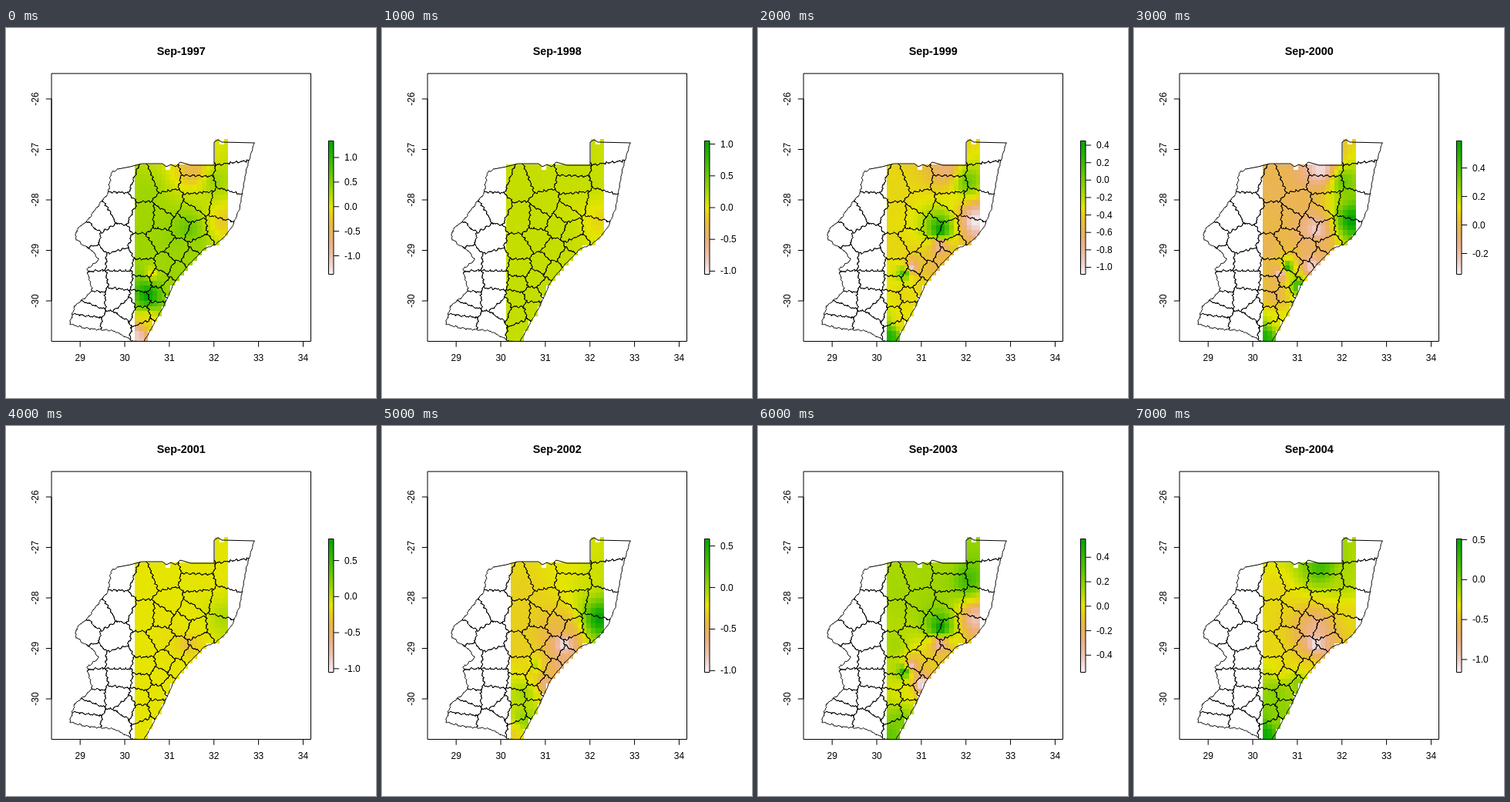
Animation, 480 px wide and 480 px high, one loop 8 s. Source, as an HTML page with a canvas:

```html
<!DOCTYPE html>
<html>
<head>
<meta charset="utf-8">
<style>
html, body { margin: 0; width: 100%; height: 100%; overflow: hidden; background: #fff; }
canvas { display: block; width: 480px; height: 480px; }
</style>
</head>
<body>
<canvas id="stage" width="480" height="480"></canvas>
<script>
const ctx = document.getElementById('stage').getContext('2d');
const FONT = '"Liberation Sans", Arial, sans-serif';
const LINE = 14.4;
const PLOT = { left: 59.04, top: 59.04, right: 395.5, bottom: 406.5 };
const GRID = { x: 167, y: 144.4, w: 5.785, h: 6.55, cols: 21, rows: 40 };
const BAR = { x: 418, y: 146, w: 7, h: 173 };

// Gauge sites: x, y and weight. The surface is an inverse-distance blend of them.
const gauges = {
  west: [185, 215, 1], inner: [178, 285, .8], north: [242, 183, 1], lake: [272, 200, 1],
  east: [282, 250, 1], hill: [236, 262, .9], river: [236, 282, .6], bay: [230, 308, .5],
  ridge: [199, 310, .25], dam: [190, 318, .25], port: [213, 334, .4],
  valley: [184, 346, .9], south: [185, 380, .7], cape: [170, 400, .7]
};

// Levels run from 0 (bottom of the colour bar) to 100 (top); unlisted gauges sit at base.
const years = [
  { lo: -1.376, hi: 1.337, step: .5, base: 63, at: { north: 34, east: 42, hill: 75, dam: 45, valley: 100, south: 46, cape: 8 } },
  { lo: -1.05, hi: 1.05, step: .5, base: 56, extra: 1, at: { east: 46 } },
  { lo: -1.08, hi: .449, step: .2, base: 46, at: { north: 25, lake: 73, east: 1, hill: 100, river: 15, bay: 33, ridge: 5, dam: 88, cape: 92 } },
  { lo: -.346, hi: .59, step: .2, base: 32, at: { north: 4, lake: 73, east: 100, hill: 8, bay: 5, ridge: 92, dam: 4, port: 86, south: 50, cape: 92 } },
  { lo: -1.05, hi: .8, step: .5, base: 50, at: { east: 60, river: 38 } },
  { lo: -1.02, hi: .585, step: .5, base: 44, at: { north: 50, lake: 54, east: 100, hill: 36, river: 0, bay: 25, ridge: 60, port: 22, valley: 62, south: 66 } },
  { lo: -.54, hi: .55, step: .2, base: 62, at: { lake: 83, east: 12, hill: 100, river: 12, bay: 42, ridge: 8, dam: 95, port: 0, valley: 52, south: 70, cape: 75 } },
  { lo: -1.16, hi: .51, step: .5, base: 46, at: { north: 83, lake: 60, hill: 20, river: 0, port: 68, valley: 68, south: 66, cape: 97 } }
];

const parse = s => s.split(' ').map(p => p.split(',').map(Number));

const north = parse('145,183 161,180 176,176 203,176 208,180 214,177 220,180 226,174 240,178 270,178 270,148 275,145 280,148 322,149');
const coast = parse('322,149 312,183 303,234 293,259 283,271 272,281 258,286 238,306 219,329 205,360 179,407');
const west = parse('145,183 136,188 133,213 121,229 105,251 92,261 90,274 113,290 120,302 105,313 112,341 89,361 83,384 106,390 140,393 166,407');

// District centres; borders lie midway between neighbours.
const centres = parse(
  '150,195 148,232 122,247 104,268 140,275 112,300 148,303 115,331 148,327 145,350 112,351 107,365 105,382 142,385 157,364 ' +
  '178,205 206,194 246,203 247,180 290,160 294,190 283,232 248,225 213,229 180,246 203,247 238,240 275,262 ' +
  '228,256 200,274 246,264 222,290 253,280 179,287 240,300 180,312 208,306 222,314 178,332 198,326 212,337 195,346 175,352 196,365 175,371 184,392'
);

// A smooth displacement that makes straight borders meander like surveyed ones.
function meander([x, y], size) {
  return [
    x + size * (Math.sin(.75 * y + .4 * x) + .8 * Math.sin(1.7 * y - .9 * x)),
    y + size * (Math.sin(.8 * x - .3 * y) + .8 * Math.sin(1.6 * x + 1.1 * y))
  ];
}

function roughen(points, size) {
  const out = [];
  for (let i = 1; i < points.length; i++) {
    const [ax, ay] = points[i - 1], [bx, by] = points[i];
    const n = Math.ceil(Math.hypot(bx - ax, by - ay) / 1.3);
    for (let k = 0; k <= n; k++) {
      out.push(meander([ax + (bx - ax) * k / n, ay + (by - ay) * k / n], size));
    }
  }
  return out;
}

// Keeps the part of a polygon that is nearer to a than to b.
function nearer(polygon, a, b) {
  const side = ([x, y]) =>
    (x - (a[0] + b[0]) / 2) * (b[0] - a[0]) + (y - (a[1] + b[1]) / 2) * (b[1] - a[1]);
  const out = [];
  polygon.forEach((p, i) => {
    const q = polygon[(i + 1) % polygon.length];
    const sp = side(p), sq = side(q);
    if (sp <= 0) out.push(p);
    if (sp * sq < 0) {
      const t = sp / (sp - sq);
      out.push([p[0] + (q[0] - p[0]) * t, p[1] + (q[1] - p[1]) * t]);
    }
  });
  return out;
}

const districts = centres.map(a => {
  let cell = [[60, 120], [350, 120], [350, 430], [60, 430]];
  centres.forEach(b => { if (a !== b) cell = nearer(cell, a, b); });
  return roughen([...cell, cell[0]], .9);
});
const outline = [...north, ...roughen(coast, .3), ...roughen(west, .7).reverse()];

function coastX(y) {
  const i = coast.findIndex(p => p[1] >= y);
  const [ax, ay] = coast[i - 1] || coast[0], [bx, by] = coast[i];
  return by === ay ? bx : ax + (bx - ax) * (y - ay) / (by - ay);
}

function hsv(h, s, v) {
  const channel = n => {
    const k = (n + h / 60) % 6;
    return Math.round(255 * v * (1 - s * Math.max(0, Math.min(k, 4 - k, 1))));
  };
  return `rgb(${channel(5)},${channel(3)},${channel(1)})`;
}

function terrain(level) {
  const u = 2 - Math.max(0, Math.min(100, level)) / 50;
  if (u < 1) return hsv(120 - 60 * u, 1, .65 + .25 * u);
  const w = u - 1;
  return hsv(60 - 60 * w, 1 - w, .9 + .05 * w);
}

function surface(x, y, { base, at }) {
  let sum = 0, total = 0;
  for (const name in gauges) {
    const [gx, gy, strength] = gauges[name];
    const dx = (x - gx) / GRID.w, dy = (y - gy) / GRID.h;
    const weight = strength / (dx * dx + dy * dy + .05);
    sum += weight * (at[name] ?? base);
    total += weight;
  }
  return sum / total;
}

function hasCell(col, row, x, y) {
  if (row < 5 && col < 18) return false;
  if ((row === 0 && col === 19) || (row === 5 && col === 7)) return false;
  return y < 149 || x < coastX(Math.min(y, 406)) + .5;
}

function drawCells(year) {
  for (let row = 0; row < GRID.rows; row++) {
    const top = Math.round(GRID.y + row * GRID.h);
    const bottom = Math.min(406, Math.round(GRID.y + (row + 1) * GRID.h));
    const cy = GRID.y + (row + .5) * GRID.h;
    for (let col = -(year.extra || 0); col < GRID.cols; col++) {
      const cx = GRID.x + (col + .5) * GRID.w;
      if (!hasCell(col, row, cx, cy)) continue;
      const left = Math.round(GRID.x + col * GRID.w);
      const right = Math.round(GRID.x + (col + 1) * GRID.w);
      ctx.fillStyle = terrain(surface(cx, cy, year));
      ctx.fillRect(left, top, right - left, bottom - top);
    }
  }
}

function trace(points) {
  ctx.beginPath();
  points.forEach(([x, y]) => ctx.lineTo(x, y));
}

function line(points) {
  trace(points);
  ctx.stroke();
}

function drawBorders() {
  ctx.save();
  ctx.beginPath();
  ctx.rect(59, 59, 337, 348);
  ctx.clip();
  line(outline);
  trace(outline);
  ctx.clip();
  districts.forEach(line);
  ctx.restore();
}

function text(label, x, y, align = 'center', font = '12px') {
  ctx.font = `${font} ${FONT}`;
  ctx.textAlign = align;
  ctx.fillText(label, x, y);
}

function drawAxes() {
  const { left, top, right, bottom } = PLOT;
  const lonX = i => 96.2 + i * 57.85;
  const latY = i => 92 + i * 65.5;
  ctx.strokeRect(left, top, right - left, bottom - top);
  line([[lonX(0), bottom], [lonX(5), bottom]]);
  line([[left, latY(0)], [left, latY(4)]]);
  for (let i = 0; i < 6; i++) {
    line([[lonX(i), bottom], [lonX(i), bottom + LINE / 2]]);
    text(29 + i, lonX(i), 432);
  }
  for (let i = 0; i < 5; i++) {
    line([[left, latY(i)], [left - LINE / 2, latY(i)]]);
    ctx.save();
    ctx.translate(left - 1.2 * LINE, latY(i));
    ctx.rotate(-Math.PI / 2);
    text(-26 - i, 0, 0);
    ctx.restore();
  }
}

function drawBar({ lo, hi, step }) {
  for (let i = 0; i < BAR.h; i++) {
    ctx.fillStyle = terrain(100 - 100 * i / (BAR.h - 1));
    ctx.fillRect(BAR.x, BAR.y + i, BAR.w, 1);
  }
  ctx.fillStyle = '#000';
  ctx.strokeRect(BAR.x + .5, BAR.y + .5, BAR.w - .5, BAR.h);
  for (let k = Math.ceil(lo / step); k * step <= hi; k++) {
    const y = BAR.y + .5 + (hi - k * step) / (hi - lo) * BAR.h;
    line([[BAR.x + BAR.w, y], [BAR.x + BAR.w + LINE / 2, y]]);
    text((k * step).toFixed(1), 439, Math.round(y + 4), 'left');
  }
}

function draw(index) {
  const year = years[index];
  ctx.fillStyle = '#fff';
  ctx.fillRect(0, 0, 480, 480);
  drawCells(year);
  ctx.strokeStyle = ctx.fillStyle = '#000';
  ctx.lineWidth = 1;
  ctx.lineJoin = 'round';
  drawBorders();
  drawAxes();
  text(`Sep-${1997 + index}`, (PLOT.left + PLOT.right) / 2, 35, 'center', `bold ${LINE}px`);
  drawBar(year);
}

const start = performance.now();
let shown = -1;
function tick() {
  const index = Math.floor((performance.now() - start) / 1000) % years.length;
  if (index !== shown) draw(shown = index);
  requestAnimationFrame(tick);
}
tick();
</script>
</body>
</html>
```
